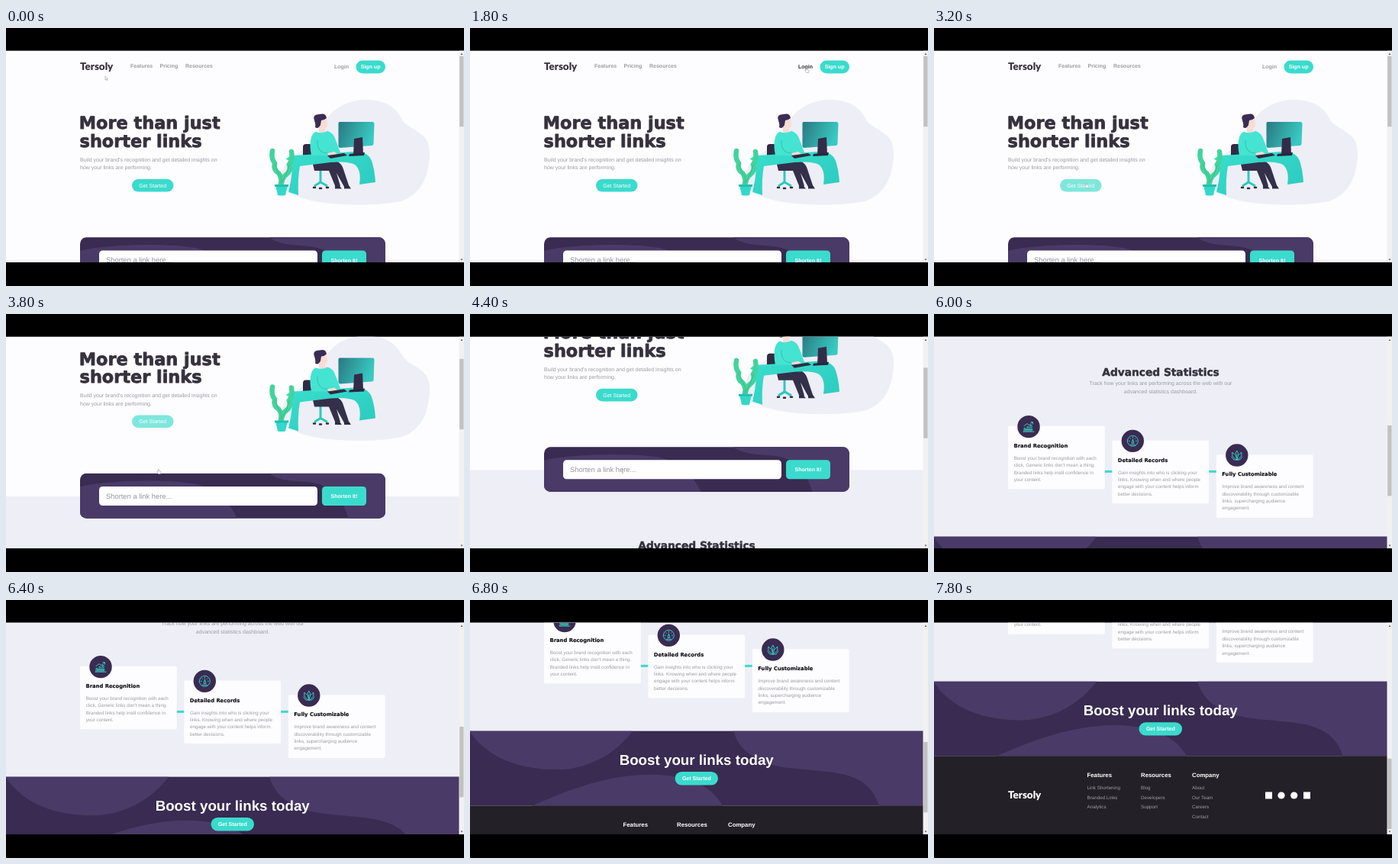
Write an HTML page that moves like this. It is 600 by 338 pixels and loops after 8000 ms.

```html
<!DOCTYPE html>
<html lang="en">
<head>
<meta charset="utf-8">
<title>Link shortener landing page</title>
<style>
  html, body { margin: 0; width: 100%; height: 100%; overflow: hidden; background: #000; }
  svg { display: block; width: 100%; height: 100%; }
  text { font: 7.03px "Liberation Sans", Arial, sans-serif; text-rendering: geometricPrecision; fill: #9d9ba5; white-space: pre; }
  .bold { font-weight: 700; }
  .black { font-family: "DejaVu Sans", sans-serif; font-weight: 700; fill: #35323e; stroke: #35323e; stroke-width: .035em; stroke-linejoin: round; }
  .hero { font-size: 22.4px; }
  .section { font-size: 13.75px; }
  .card-title { font-size: 6.8px; fill: #100e16; stroke: #100e16; stroke-width: .02em; }
  .small { font-size: 6.25px; }
  .brand { font: 900 13.4px Lato, sans-serif; fill: #35323e; }
  .boost { font-size: 18.75px; }
  .foot-title { font-size: 7.81px; }
  .prompt { font-size: 9.37px; fill: #96949c; }
  .white { fill: #fff; }
  .mid { text-anchor: middle; }
  .teal { fill: #3adbcd; }
  .dark { fill: #392b51; }
  .light { fill: #4a3a67; }
  .icon { fill: none; stroke: #3adbcd; stroke-width: .9; stroke-linecap: round; stroke-linejoin: round; }
</style>
</head>
<body>
<svg viewBox="0 0 600 338">
  <defs>
    <clipPath id="view"><rect y="29.700" width="600" height="277.200"/></clipPath>
    <clipPath id="panel"><rect x="97" y="274.300" width="400" height="58.900" rx="8.500"/></clipPath>
    <linearGradient id="screen" x2="1" y2=".3">
      <stop offset="0" stop-color="#2a7880"/><stop offset="1" stop-color="#38c9c2"/>
    </linearGradient>
    <linearGradient id="desk" x2="1" y2="1">
      <stop offset="0" stop-color="#38dfcd"/><stop offset="1" stop-color="#2bc9bd"/>
    </linearGradient>
  </defs>
  <rect width="600" height="338"/>
  <g clip-path="url(#view)">
    <rect y="29" width="600" height="279" fill="#fdfcfe"/>
    <g id="page">
      <!-- Navigation -->
      <text class="brand" x="97" y="54.500">Tersoly</text>
      <text class="bold" data-hover="500,750" x="163" y="52.300">Features</text>
      <text class="bold" data-hover="800,1000" x="201.500" y="52.300">Pricing</text>
      <text class="bold" data-hover="1080,1350" x="235" y="52.300">Resources</text>
      <text class="bold" data-hover="1650,1950" x="430" y="53.300">Login</text>
      <rect class="teal" data-hover="2000,2450" x="458.500" y="42.500" width="38.500" height="17" rx="8.500"/>
      <text class="bold white mid" x="477.600" y="53.400">Sign up</text>

      <!-- Hero -->
      <text class="black hero" x="95.800" y="132.300">More than just</text>
      <text class="black hero" x="96.600" y="155.800">shorter links</text>
      <text x="97" y="174.800">Build your brand's recognition and get detailed insights on</text>
      <text x="97" y="185.400">how your links are performing.</text>
      <rect class="teal" data-hover="2930,4000" x="165" y="198" width="54.500" height="16.600" rx="8.300"/>
      <text class="white mid" x="192.200" y="208.800">Get Started</text>

      <!-- Illustration -->
      <path fill="#eeeef7" d="M471 94C499 94 511 105 519 120C530 137 556 134 555 165C554 195 544 218 517 227C480 234 415 233 386 222C358 211 353 187 375 169C396 155 410 145 417 126C425 105 449 94 471 94Z"/>
      <rect x="389" y="152" width="12" height="22" rx="4" fill="#2f2c43"/>
      <path fill="none" stroke="#2bc9bd" stroke-width="3" d="M412 184V204M404 207L412 202L421 207"/>
      <path fill="none" stroke="#2f2c43" stroke-width="2.500" stroke-linecap="round" d="M403 209h2M411 210h2M420 209h2"/>
      <path fill="#34304a" d="M401 174H432Q440 177 442 185L449 206L443 208L433 190L438 207L432 209L423 187H404Z"/>
      <path fill="#2f2c43" d="M431 207l6 0l3 3.500h-9zM443 206l6 0l3 4.500h-9z"/>
      <path fill="url(#desk)" d="M367 172Q369 168 378 167L456 162Q474 161 479 174Q483 186 484 202L463 205Q466 186 457 179Q448 174 425 176L385 181Q382 198 383 219L370 215Q376 190 374 179Q373 174 367 172Z"/>
      <path fill="url(#screen)" d="M437 123H480Q482.500 123 482.500 126L481.500 152Q481.500 154 479 154L438 157Q435.500 157 435.500 154V125Q435.500 123 437 123Z"/>
      <path fill="#322c49" d="M456 145L467 143L468 165L455 167Z"/>
      <path fill="#2b2640" d="M450 165L470 163L469 167L449 168Z"/>
      <path fill="#fbdcd3" d="M410 127h8v9q-4 4-8 0z"/>
      <path fill="#fbdcd3" d="M410 120Q414 116 420 119L421 127Q420 132 416 132Q410 131 410 120Z"/>
      <path fill="#3b2c56" d="M404 121Q401 113 411 113Q419 111 420 118Q417 121 413 121L412 127Q409 133 405 130Q406 127 404 121Z"/>
      <path fill="#45e3d2" d="M406 136Q414 139 421 135Q429 137 432 147L438 163L429 167H400Q397 153 400 143Q402 137 406 136Z"/>
      <path fill="none" stroke="#27bdb4" stroke-width=".8" d="M408 147Q407 159 415 163L428 165"/>
      <path fill="#fbdcd3" d="M421 164l9-2l4 3l-11 3z"/>
      <path fill="#2f2c43" d="M421 167L443 164L447 167L425 171Z"/>
      <g fill="none" stroke="#43d39c" stroke-width="6.500" stroke-linecap="round">
        <path d="M360 204Q362 196 357 190Q350 186 352 177Q347 171 349 161"/>
        <path d="M361 203Q362 196 367 192Q374 187 371 179Q376 172 374 162"/>
      </g>
      <path fill="none" stroke="#2fb58c" stroke-width=".7" d="M360 204Q362 196 357 190L352 177M361 203L367 192L371 179"/>
      <path fill="#32d8c8" d="M353 206H369L366 219Q361 220 356 219Z"/>
      <path fill="#27bdb4" d="M352 205h18v3h-18z"/>

      <!-- Shorten form -->
      <rect y="304.500" width="600" height="315" fill="#eeeef6"/>
      <g clip-path="url(#panel)">
        <rect class="dark" x="97" y="274" width="400" height="60"/>
        <path class="light" d="M97 292C120 285 200 281 240 287C280 292 292 312 303 334H97Z"/>
        <path class="light" d="M345 274C356 284 376 284 398 286C429 290 440 307 449 334H497V274Z"/>
      </g>
      <rect x="122" y="291.500" width="286" height="25" rx="4.500" fill="#fff"/>
      <text class="prompt" x="131" y="307.300">Shorten a link here...</text>
      <rect class="teal" x="414" y="291.500" width="58" height="25" rx="4.500"/>
      <text class="bold white mid" x="443" y="306.500">Shorten It!</text>

      <!-- Statistics -->
      <text class="black section mid" x="297" y="407.700">Advanced Statistics</text>
      <text class="mid" x="297" y="420.600">Track how your links are performing across the web with our</text>
      <text class="mid" x="297" y="431.500">advanced statistics dashboard.</text>
      <rect class="teal" x="223" y="532" width="148" height="3"/>
      <g id="cards"></g>

      <!-- Call to action -->
      <rect class="dark" y="618.800" width="600" height="98"/>
      <path class="light" d="M0 620C25 658 75 672 125 669C160 665 192 647 213 618.800H0Z"/>
      <path class="light" d="M81 717C130 695 185 675 240 676C288 677 317 691 331 717Z"/>
      <path class="light" d="M345 618.800C354 648 380 664 425 668C480 674 521 671 536 717H600V618.800Z"/>
      <text class="bold white boost mid" x="296.700" y="662.800">Boost your links today</text>
      <rect class="teal" x="268.500" y="672.200" width="56.500" height="17.400" rx="8.700"/>
      <text class="bold white mid" x="296.800" y="683.400">Get Started</text>

      <!-- Footer -->
      <rect y="716.700" width="600" height="104" fill="#232127"/>
      <text class="brand white" x="97" y="771.500">Tersoly</text>
      <g id="footer"></g>
      <g class="white">
        <rect x="434" y="763.500" width="9" height="9"/>
        <circle cx="455" cy="768" r="4.600"/>
        <circle cx="471.700" cy="768" r="4.600"/>
        <rect x="484" y="763.500" width="9" height="9"/>
      </g>
    </g>
    <g id="cursor" fill="#fff" stroke="#8b8992" stroke-width=".5" stroke-linejoin="round">
      <path id="arrow" d="M0-2V3L1.200 2L2 3.800L2.800 3.400L2 1.700H3.400Z"/>
      <path id="hand" d="M-1-2.500Q0-3.200 .4-2.200V-.4L2.800 .3Q3.200 1.500 2.300 3.500H-.6L-2.400 .8Q-1.800 .2-1 1Z"/>
      <path id="beam" fill="none" d="M-1-2.500H1M0-2.500V2.500M-1 2.500H1"/>
    </g>
    <!-- Scrollbar -->
    <rect x="593.500" y="29" width="6.500" height="279" fill="#f1f1f1"/>
    <path fill="#55535c" d="M595.500 35h3l-1.500-2zM595.500 302.500h3l-1.500 2z"/>
    <rect id="thumb" x="594.200" y="37" width="5.300" height="92.300" fill="#c1c1c1"/>
  </g>
</svg>
<script>
const LOOP = 8000;
const $ = id => document.getElementById(id);

const cards = [
  ["Brand Recognition", 97, 474,
    ["Boost your brand recognition with each", "click. Generic links don't mean a thing.",
     "Branded links help instil confidence in", "your content."],
    "M-6 6V2h2v4M-2 6V0h2v6M2 6V-2h2v8M-7 6.500H7M-6-1L-2-4L1-2L5-6M3-6H5.500V-3.500M-5 4h10"],
  ["Detailed Records", 233.3, 492.7,
    ["Gain insights into who is clicking your", "links. Knowing when and where people",
     "engage with your content helps inform", "better decisions."],
    "M-7 0A7 7 0 1 1 7 0A7 7 0 1 1-7 0M0-5.500v1.500M-5 0h1M4 0h1M-3.500-3.500l.7.7M3.500-3.500l-.7.7M0-2L-1.300 3H1.300ZM-3 5H3"],
  ["Fully Customizable", 369.8, 511.4,
    ["Improve brand awareness and content", "discoverability through customizable",
     "links, supercharging audience", "engagement."],
    "M0 6L-2-2L0-6L2-2ZM-1 6L-6 1L-6-4L-3-1M1 6L6 1L6-4L3-1M-7 2L-4 6H4L7 2M0-1V4"]
];
$("cards").innerHTML = cards.map(([title, x, y, lines, icon]) => `
  <rect x="${x}" y="${y}" width="126.800" height="82.700" rx="2" fill="#fdfcfe"/>
  <circle class="dark" cx="${x + 27}" cy="${y + .8}" r="14.700"/>
  <path class="icon" transform="translate(${x + 27} ${y + .8})" d="${icon}"/>
  <text class="black card-title" x="${x + 7.5}" y="${y + 28.2}">${title}</text>` +
  lines.map((line, i) =>
    `<text class="small" x="${x + 7.7}" y="${y + 44 + i * 9.4}">${line}</text>`).join("")).join("");

const footer = [
  [200.5, "Features", "Link Shortening", "Branded Links", "Analytics"],
  [271, "Resources", "Blog", "Developers", "Support"],
  [338, "Company", "About", "Our Team", "Careers", "Contact"]
];
$("footer").innerHTML = footer.map(([x, title, ...links]) =>
  `<text class="bold white foot-title" x="${x}" y="744">${title}</text>` +
  links.map((link, i) =>
    `<text class="small" x="${x}" y="${760.2 + i * 12.5}">${link}</text>`).join("")).join("");

// Keyframes are [time, ...values], joined by straight lines.
const scrollKeys = [[0, 0], [3400, 0], [3800, 65.5], [4000, 65.5], [4400, 100],
  [6000, 327], [6800, 447], [7200, 512]];
const cursorKeys = [[0, 130, 65], [200, 130, 65], [600, 177, 53], [900, 213, 53], [1150, 252, 53],
  [1300, 252, 53], [1650, 432, 54], [1800, 441, 55], [2100, 478, 55], [2350, 478, 55],
  [2800, 240, 185], [3000, 200, 206]];

const clamp = v => Math.max(0, Math.min(1, v));
const mix = (a, b, k) => a.map((v, i) => v + (b[i] - v) * k);

function sample(keys, t) {
  const next = keys.findIndex(key => key[0] > t);
  if (next < 0) return keys[keys.length - 1].slice(1);
  const a = keys[next - 1], b = keys[next];
  return mix(a.slice(1), b.slice(1), (t - a[0]) / (b[0] - a[0]));
}

const targets = [...document.querySelectorAll("[data-hover]")].map(el => {
  const [start, end] = el.dataset.hover.split(",").map(Number);
  const colors = el.tagName === "rect"
    ? [[58, 219, 205], [126, 231, 220]]
    : [[157, 155, 165], [45, 42, 54]];
  return { el, start, end, colors };
});

function draw(now) {
  const t = now % LOOP;
  const [scroll] = sample(scrollKeys, t);
  const [x, y] = sample(cursorKeys, t);
  let pointing = false;
  for (const { el, start, end, colors } of targets) {
    const amount = clamp((t - start) / 120) - clamp((t - end) / 120);
    el.style.fill = `rgb(${mix(...colors, amount).map(Math.round)})`;
    pointing ||= amount > .5;
  }
  $("page").setAttribute("transform", `translate(0 ${-scroll})`);
  $("thumb").setAttribute("y", 37 + scroll / 3);
  $("cursor").setAttribute("transform", `translate(${x} ${y})`);
  const shape = t > 4800 ? "" : pointing ? "hand" : t > 4000 ? "beam" : "arrow";
  for (const id of ["arrow", "hand", "beam"]) $(id).style.display = id === shape ? "" : "none";
  requestAnimationFrame(draw);
}
requestAnimationFrame(draw);
</script>
</body>
</html>
```
